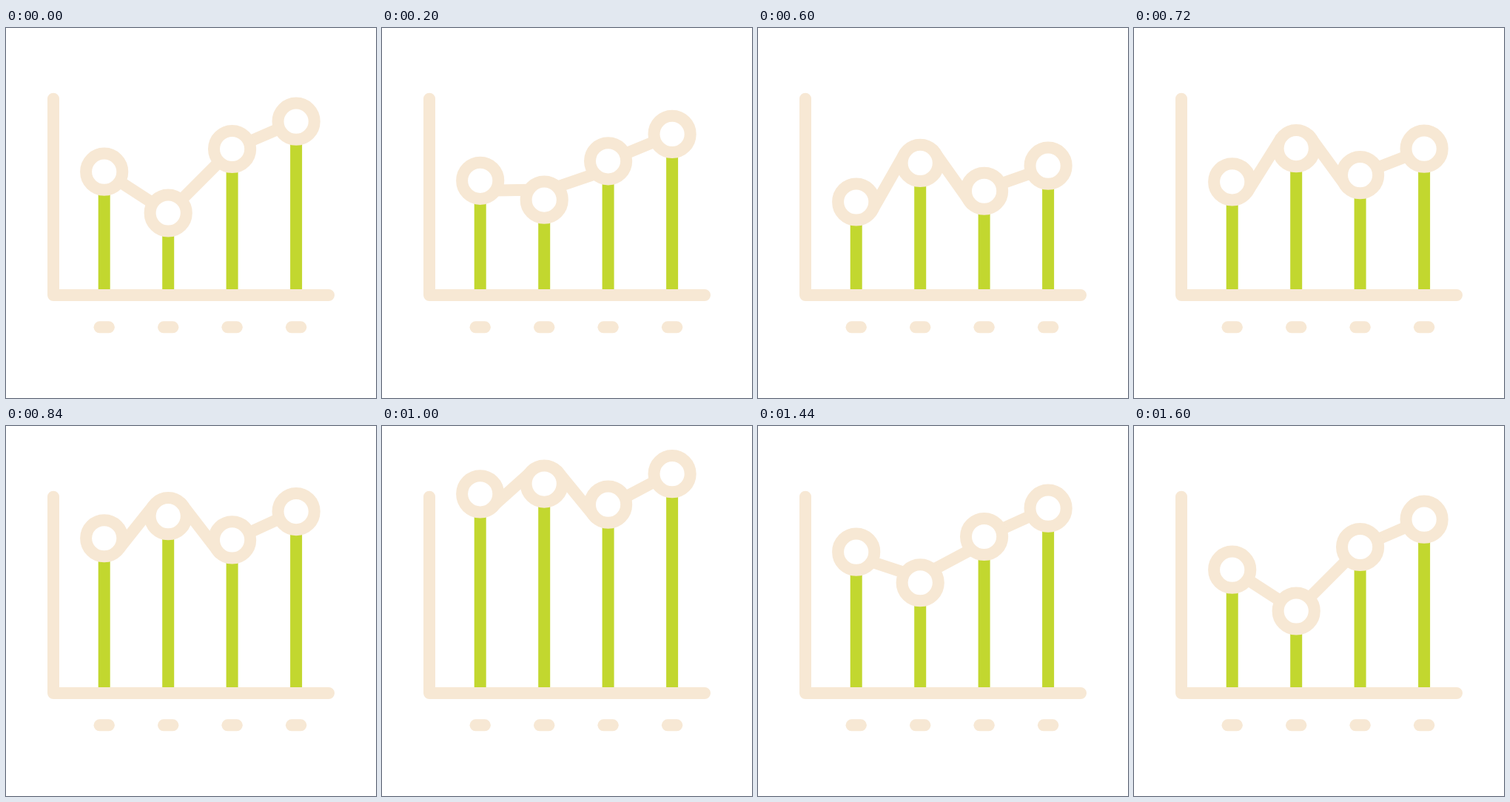
An HTML page with a canvas that plays this animation: 500x500 px, repeating every 2000 ms.

```html
<!DOCTYPE html>
<html lang="en">
<head>
<meta charset="utf-8">
<title>Line chart</title>
<style>
  html, body { margin: 0; width: 100%; height: 100%; overflow: hidden; background: #fff; }
  canvas { display: block; width: 500px; height: 500px; }
</style>
</head>
<body>
<canvas id="stage" width="500" height="500"></canvas>
<script>
const ctx = document.getElementById('stage').getContext('2d');
const CREAM = '#f7e8d4', GREEN = '#c2d72f';
const LOOP = 2000, STEP = 40, RING = 24.6, WIDTH = 16;

const columns = [132.7, 219.2, 305.6, 392.1];
const rest = [194.2, 250, 163.5, 126.2];
const poses = [
  { time: 0, heights: rest },
  { time: 533, heights: [238.3, 184.8, 222.9, 189] },
  { time: 1116, heights: [81.2, 70.3, 97.7, 55.7] },
  { time: 1603, heights: rest }
];

// Symmetric cubic bezier (k, 0, 1 - k, 1), solved by bisection.
function ease(x, k = 0.48) {
  let low = 0, high = 1;
  for (let i = 0; i < 24; i++) {
    const s = (low + high) / 2, r = 1 - s;
    const bx = 3 * k * s * r * r + 3 * (1 - k) * s * s * r + s * s * s;
    if (bx < x) low = s; else high = s;
  }
  return low * low * (3 - 2 * low);
}

function heightsAt(time) {
  const next = poses.findIndex(pose => pose.time > time);
  if (next < 0) return rest;
  const from = poses[next - 1], to = poses[next];
  const p = ease((time - from.time) / (to.time - from.time));
  return from.heights.map((y, i) => y + (to.heights[i] - y) * p);
}

function stroke(color, ...points) {
  ctx.strokeStyle = color;
  ctx.beginPath();
  points.forEach(([x, y]) => ctx.lineTo(x, y));
  ctx.stroke();
}

// Connectors keep the anchor points they have on the rings at rest.
function connect(i, ys) {
  const dx = columns[i + 1] - columns[i], dy = rest[i + 1] - rest[i];
  const scale = RING / Math.hypot(dx, dy);
  const ox = dx * scale, oy = dy * scale;
  stroke(CREAM, [columns[i] + ox, ys[i] + oy], [columns[i + 1] - ox, ys[i + 1] - oy]);
}

function draw(time) {
  const ys = heightsAt(time);
  ctx.fillStyle = '#fff';
  ctx.fillRect(0, 0, 500, 500);
  ctx.lineWidth = WIDTH;
  ctx.lineCap = ctx.lineJoin = 'round';

  ctx.fillStyle = GREEN;
  columns.forEach((x, i) => ctx.fillRect(x - 8, ys[i] + RING, WIDTH, 361 - ys[i] - RING));

  stroke(CREAM, [64, 95.7], [64, 361], [436, 361]);
  columns.forEach(x => stroke(CREAM, [x - 6.2, 404.3], [x + 6.2, 404.3]));

  for (let i = 0; i < 3; i++) connect(i, ys);

  ctx.fillStyle = '#fff';
  columns.forEach((x, i) => {
    ctx.beginPath();
    ctx.arc(x, ys[i], RING, 0, Math.PI * 2);
    ctx.fill();
    ctx.stroke();
  });
}

const start = performance.now();
function tick() {
  const time = (performance.now() - start) % LOOP;
  draw(Math.floor(time / STEP) * STEP);
  requestAnimationFrame(tick);
}
tick();
</script>
</body>
</html>
```
